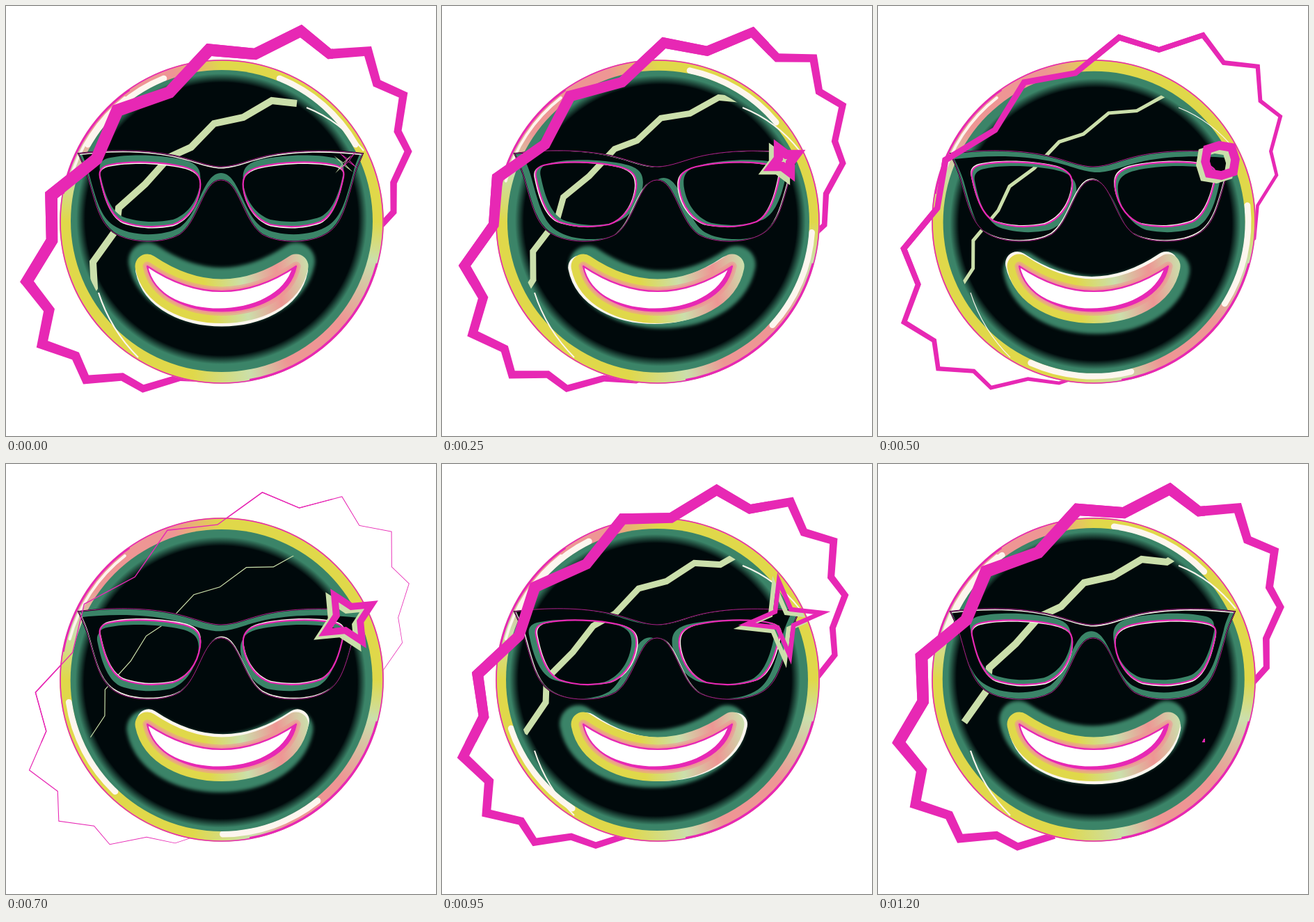
Recreate the animation shown at these times as an HTML page with a canvas. Size 618 by 618 pixels, loop 1.25 s.

```html
<!DOCTYPE html>
<html lang="en">
<head>
<meta charset="utf-8">
<title>Cool smile</title>
<style>
html, body { margin: 0; width: 100%; height: 100%; overflow: hidden; background: #fff; }
canvas { display: block; width: 618px; height: 618px; }
</style>
</head>
<body>
<canvas id="stage" width="618" height="618"></canvas>
<script>
const ctx = document.getElementById('stage').getContext('2d');
const LOOP = 1250, STEP = 50, TAU = Math.PI * 2, DEG = Math.PI / 180;
const CX = 310, CY = 310, R = 233;
const PINK = '#e728b4', YELLOW = '#e0d84a', SALMON = '#ee9694', CREAM = '#fdf6ee',
      GREEN = '#3b8468', PALE = '#cbdfab', BLACK = '#00090b';

// Teeth alternate valley / peak; each slides to the next of its kind per loop.
const RING = [
  [340,520],[292,536],[250,534],[197,550],[167,533],[115,537],[100,503],[52,486],[62,437],[30,396],
  [66,337],[65,272],[130,220],[160,150],[235,124],[292,63],[358,69],[424,36],[465,69],[520,65],
  [533,111],[571,128],[563,180],[578,209],[557,254],[557,296],[521,335],[510,390],[470,400],[440,460]
];
const REFLECTION = [
  [105,440],[127,405],[125,368],[158,322],[162,290],[200,256],[235,217],[266,203],[299,169],
  [341,160],[382,136],[418,140],[450,120],[490,115]
];

const WEIGHT = [[0,1],[150,.97],[350,.8],[500,.5],[700,.08],[800,.42],[950,.9],[1100,1],[1250,1]];
// time, diagonal radius, second radius, band width
const STAR = [
  [0,2,18,.8],[50,4,25,4],[150,10,37,14],[350,22,31,12.5],[500,32,28,12.5],
  [700,50,23,10],[950,67,20,6.5],[1100,66,9,1.5],[1150,30,3,0],[1200,0,0,0],[1250,2,18,.8]
];

const frame = new Path2D('M104 212C150 206 200 206 242 215C270 221 290 231 309 231C330 231 348 221 376 215' +
  'C420 206 470 207 513 212C508 225 502 235 499 250C488 290 482 312 464 325C440 342 392 342 368 328' +
  'C340 308 335 250 309 250C283 250 278 308 250 328C226 342 178 342 154 325C136 312 130 290 119 250' +
  'C115 235 110 225 104 212Z');
const lens = new Path2D('M150 228C180 222 225 224 255 231C275 236 281 245 279 262C275 290 258 308 240 314' +
  'C215 319 190 318 168 310C148 300 140 270 135 246C133 236 138 230 150 228Z');
const lenses = new Path2D(lens);
lenses.addPath(lens, new DOMMatrix([-1, 0, 0, 1, 620, 0]));
const rims = new Path2D(frame);
rims.addPath(lenses);
const mouth = new Path2D('M203 374Q310 446 417 374C400 460 220 460 203 374Z');
const streaks = new Path2D('M133 412Q150 465 190 505M432 146Q480 165 514 208');

function key(t, table) {
  let i = 1;
  while (i < table.length - 1 && table[i][0] < t) i++;
  const a = table[i - 1], b = table[i], f = (t - a[0]) / (b[0] - a[0]);
  return a.slice(1).map((v, n) => v + (b[n + 1] - v) * f);
}

function slide(pts, u) {
  const spline = (a, b, c, d) =>
    b + u / 2 * (c - a + u * (2 * a - 5 * b + 4 * c - d + u * (3 * (b - c) + d - a)));
  return pts.slice(0, -2).map((p, i) => {
    const before = pts[i - 2] || p, next = pts[i + 2], after = pts[i + 4] || next;
    return [0, 1].map(k => spline(before[k], p[k], next[k], after[k]));
  });
}

// A mitred ribbon whose width may vary along its length.
function ribbon(pts, width) {
  const normal = (a, b) => {
    const dx = b[0] - a[0], dy = b[1] - a[1], len = Math.hypot(dx, dy) || 1;
    return [-dy / len, dx / len];
  };
  const left = [], right = [];
  pts.forEach((p, i) => {
    const n = i ? normal(pts[i - 1], p) : normal(p, pts[1]);
    const m = i < pts.length - 1 ? normal(p, pts[i + 1]) : n;
    const s = width(p) / 2 / Math.max(.4, 1 + n[0] * m[0] + n[1] * m[1]);
    const ox = (n[0] + m[0]) * s, oy = (n[1] + m[1]) * s;
    left.push([p[0] + ox, p[1] + oy]);
    right.unshift([p[0] - ox, p[1] - oy]);
  });
  return polygon(left.concat(right));
}

function polygon(pts) {
  const path = new Path2D();
  pts.forEach(p => path.lineTo(p[0], p[1]));
  path.closePath();
  return path;
}

function disc(r, x = CX, y = CY) {
  const path = new Path2D();
  path.arc(x, y, r, 0, TAU);
  return path;
}

function layer(draw) {
  ctx.save();
  draw();
  ctx.restore();
}

function fill(path, color) {
  ctx.fillStyle = color;
  ctx.fill(path, 'evenodd');
}

function stroke(path, color, width) {
  ctx.strokeStyle = color;
  ctx.lineWidth = width;
  ctx.stroke(path);
}

function arc(r, from, to, color, width) {
  const path = new Path2D();
  path.arc(CX, CY, r, from * DEG, to * DEG);
  stroke(path, color, width);
}

// Paints the sliver of a shape left uncovered by its own shifted copy.
function sliver(path, dx, dy, color) {
  layer(() => {
    const rest = new Path2D();
    rest.rect(-50, -50, 718, 718);
    rest.addPath(path, new DOMMatrix([1, 0, 0, 1, dx, dy]));
    ctx.clip(path, 'evenodd');
    ctx.clip(rest, 'evenodd');
    ctx.fillStyle = color;
    ctx.fillRect(0, 0, 618, 618);
  });
}

const rimPaint = ctx.createConicGradient(0, CX, CY);
[[0, YELLOW], [.04, PALE], [.11, SALMON], [.18, SALMON], [.22, PALE], [.28, YELLOW], [.5, YELLOW],
 [.55, PALE], [.6, SALMON], [.7, SALMON], [.75, YELLOW], [1, YELLOW]].forEach(s => rimPaint.addColorStop(...s));

const lipPaint = ctx.createLinearGradient(185, 420, 435, 380);
[[0, YELLOW], [.4, YELLOW], [.62, PALE], [.82, SALMON], [1, PALE]].forEach(s => lipPaint.addColorStop(...s));

function head(light, lx, ly) {
  fill(disc(R), rimPaint);
  layer(() => {
    ctx.lineCap = 'round';
    [-41, 41].forEach(off => arc(222, light + off - 19, light + off + 19, CREAM, 9));
    arc(226, 195, 232, CREAM, 4);
  });
  arc(R - 1, 0, 360, PINK, 1.6);
  arc(R - 2, 15, 80, PINK, 3);
  arc(R - 2, 190, 235, PINK, 2.5);
  const x = CX + lx * 4, y = CY + ly * 4;
  const shade = ctx.createRadialGradient(x, y, 196, x, y, 209);
  shade.addColorStop(0, BLACK);
  shade.addColorStop(1, GREEN);
  fill(disc(217, CX + lx, CY + ly), shade);
}

function glasses(lx, ly) {
  sliver(lenses, lx * 7, ly * 7, GREEN);
  sliver(lenses, -lx * 2.5, -ly * 2.5, CREAM);
  fill(rims, BLACK);
  sliver(rims, lx * 10, ly * 10, GREEN);
  sliver(rims, -lx * 2.5, -ly * 2.5, CREAM);
  stroke(frame, BLACK, 2);
  layer(() => {
    ctx.globalAlpha = .75;
    stroke(frame, PINK, 1);
  });
  stroke(lenses, PINK, 2.2);
}

function smile(lx, ly) {
  layer(() => {
    ctx.lineJoin = 'round';
    layer(() => {
      ctx.filter = 'blur(2.5px)';
      ctx.translate(lx * 7, ly * 7);
      stroke(mouth, GREEN, 54);
    });
    layer(() => {
      ctx.translate(-lx * 5, -ly * 5);
      stroke(mouth, CREAM, 34);
    });
    stroke(mouth, lipPaint, 35);
    layer(() => {
      ctx.globalAlpha = .6;
      stroke(mouth, SALMON, 13);
    });
    stroke(mouth, SALMON, 7);
    fill(mouth, '#fff');
    sliver(mouth, -4, -4, PINK);
    stroke(mouth, PINK, 2.2);
  });
}

function sparkle(t) {
  const [a, b, band] = key(t, STAR);
  if (band <= 0) return;
  const turn = -49 + .09 * (t - 500);
  const star = polygon(Array.from({ length: 8 }, (_, i) => {
    const r = i % 2 ? b : a, angle = (turn + i * 45) * DEG;
    return [492 + r * Math.cos(angle), 222 + r * Math.sin(angle)];
  }));
  const outline = color => layer(() => {
    ctx.clip(star);
    stroke(star, color, band * 2);
  });
  layer(() => {
    ctx.clip(disc(R - 3));
    ctx.translate(-7, 5);
    outline(PALE);
  });
  outline(PINK);
}

function render(t) {
  const u = t / LOOP, light = -90 + 360 * u;
  const lx = Math.cos(light * DEG), ly = Math.sin(light * DEG);
  const [weight] = key(t, WEIGHT);
  const ring = ribbon(slide(RING, u), p => weight * (18 - (p[0] + p[1] - 310) / 60));

  ctx.fillStyle = '#fff';
  ctx.fillRect(0, 0, 618, 618);
  fillRing(ring);
  head(light, lx, ly);
  layer(() => {
    ctx.clip(disc(206));
    ctx.fillStyle = PALE;
    ctx.fill(ribbon(slide(REFLECTION, u), () => Math.max(1.2, 10 * weight)));
  });
  if (weight > .2) stroke(streaks, CREAM, 2.2 * weight);
  glasses(lx, ly);
  smile(lx, ly);
  sparkle(t);
  layer(() => {
    ctx.beginPath();
    ctx.rect(0, 0, 470, 400);
    ctx.clip();
    fillRing(ring);
  });
}

function fillRing(path) {
  ctx.fillStyle = PINK;
  ctx.fill(path);
}

function tick() {
  render(Math.floor(performance.now() % LOOP / STEP) * STEP);
  requestAnimationFrame(tick);
}
tick();
</script>
</body>
</html>
```
